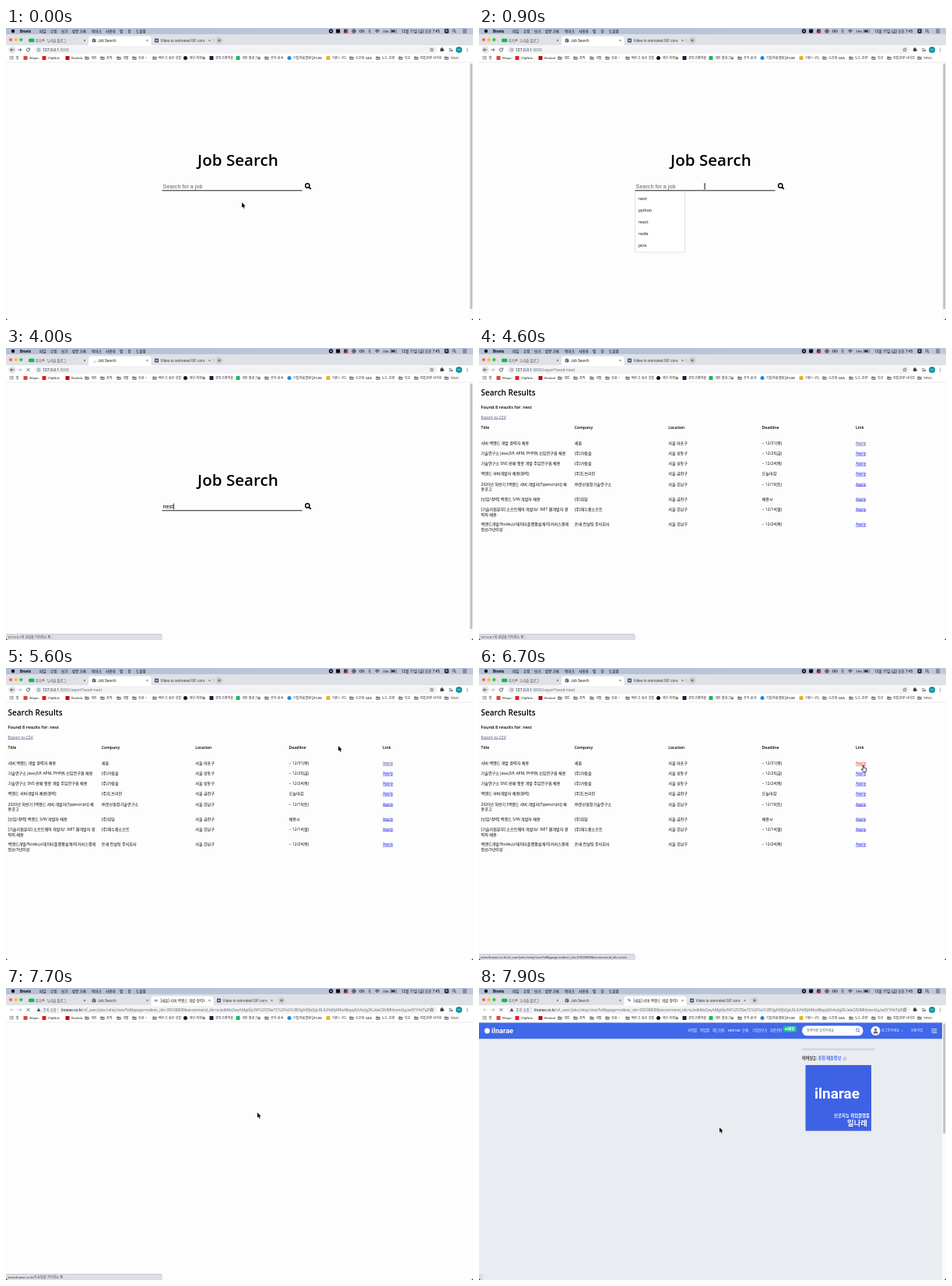
Write an HTML page with a canvas that moves like this. It is 600 px wide and 375 px high and loops after 8 s.

```html
<!DOCTYPE html>
<html lang="ko">
<head>
<meta charset="utf-8">
<title>Job Search</title>
<style>
html, body { margin: 0; width: 100%; height: 100%; overflow: hidden; background: #fdfdfd; }
canvas { display: block; width: 600px; height: 375px; }
</style>
</head>
<body>
<canvas id="stage" width="600" height="375"></canvas>
<script>
const canvas = document.getElementById('stage');
const c = canvas.getContext('2d');
const LOOP = 8000, STEP = 100;
const UI = 'Roboto, "Noto Sans CJK KR", "Noto Sans CJK", sans-serif';
const DOC = '"Open Sans", "Noto Sans CJK KR", "Noto Sans CJK", sans-serif';
const FORM = '"Liberation Sans", Arial, sans-serif';
const HOST = 'ilnarae.co.kr';
const QUERY = '/zf_user/jobs/relay/view?isMypage=no&rec_idx=39238828&recommend_ids=eJxd';
const WAITING = '의 응답을 기다리는 중...';

// --- drawing helpers; text is placed by its left edge and cap centre ---
// Laid out large and scaled down evenly, so tiny sizes keep true letter spacing.
const ZOOM = 10;
function text(s, x, y, size, color = '#222', weight = 400, family = UI) {
  c.save();
  c.translate(x, y + size * 0.36);
  c.scale(1 / ZOOM, 1 / ZOOM);
  c.font = `${weight} ${size * ZOOM}px ${family}`;
  c.fillStyle = color;
  c.fillText(s, 0, 0);
  const width = c.measureText(s).width / ZOOM;
  c.restore();
  return width;
}
function rect(x, y, w, h, color, r = 0) {
  c.fillStyle = color;
  c.beginPath();
  c.roundRect(x, y, w, h, r);
  c.fill();
}
function dot(x, y, r, color) {
  c.fillStyle = color;
  c.beginPath();
  c.arc(x, y, r, 0, 7);
  c.fill();
}
function arc(x, y, r, from, to, color, width) {
  c.strokeStyle = color;
  c.lineWidth = width;
  c.beginPath();
  c.arc(x, y, r, from, to);
  c.stroke();
}
function line(points, color, width) {
  c.strokeStyle = color;
  c.lineWidth = width;
  c.beginPath();
  points.forEach(([x, y], i) => i ? c.lineTo(x, y) : c.moveTo(x, y));
  c.stroke();
}
function cross(x, y, r, color, width) {
  line([[x - r, y - r], [x + r, y + r]], color, width);
  line([[x + r, y - r], [x - r, y + r]], color, width);
}
function clipped(x, y, w, h, draw) {
  c.save();
  c.beginPath();
  c.rect(x, y, w, h);
  c.clip();
  draw();
  c.restore();
}
function lens(x, y, r, color, width) {
  arc(x, y, r, 0, 7, color, width);
  line([[x + r * 0.75, y + r * 0.75], [x + r * 1.7, y + r * 1.7]], color, width * 1.2);
}

// --- desktop menu bar ---
function menuBar() {
  const sky = c.createLinearGradient(0, 0, 600, 0);
  sky.addColorStop(0, '#b3bfda');
  sky.addColorStop(1, '#c0c8dc');
  rect(0, 0, 600, 8, sky);
  dot(9, 4, 2.2, '#111');
  text('Brovix', 18, 4, 5, '#000', 700);
  [['파일', 43], ['수정', 57], ['보기', 71], ['방문 기록', 85], ['북마크', 110], ['사용자', 128],
   ['탭', 146], ['창', 156.5], ['도움말', 167]].forEach(([s, x]) => text(s, x, 4, 4.6, '#000', 500));
  dot(417.5, 4, 2.7, '#111');
  rect(416.6, 3.1, 1.8, 1.8, '#c0c8dc');
  rect(424, 1.5, 5.2, 5, '#111', 0.8);
  rect(434, 1.5, 5, 5, '#5b3034', 1);
  dot(438, 5, 1.5, '#e2382f');
  arc(447, 4, 2.2, 0, 7, '#222', 0.9);
  dot(447, 4, 0.9, '#222');
  arc(455.6, 4, 1.5, 0, 7, '#222', 0.7);
  arc(458.8, 4, 1.5, 0, 7, '#222', 0.7);
  line([[465.5, 2.6], [468.5, 5.4], [467, 6.8], [467, 1.2], [468.5, 2.6], [465.5, 5.4]], '#444', 0.5);
  [1.2, 2.6, 4].forEach(r => arc(477, 6.4, r, -2.35, -0.8, '#222', 0.8));
  text('78%', 484, 4, 4.4, '#111');
  c.strokeStyle = '#333';
  c.lineWidth = 0.5;
  c.strokeRect(494.5, 2.2, 7, 3.6);
  rect(495.3, 2.9, 4.4, 2.2, '#333');
  text('12월 11일 (금) 오후 7:45', 508, 4, 4.7, '#000');
  rect(563.5, 1.3, 5.2, 5.4, '#222', 1);
  text('A', 564.7, 4, 4, '#fff');
  lens(575.5, 3.5, 1.6, '#222', 0.7);
  [2, 4, 6].forEach(y => line([[587, y], [592, y]], '#222', 0.7));
}

// --- browser frame ---
function globe(x, y) {
  dot(x, y, 2.5, '#4d5156');
  line([[x - 1.8, y - 0.7], [x, y], [x - 0.5, y + 1.6]], '#e6e8eb', 0.8);
  line([[x + 0.3, y - 1.6], [x + 1.8, y - 0.5]], '#e6e8eb', 0.8);
}
function spinner(x, y, age, color, dir) {
  const head = -Math.PI / 2 + dir * age / 1000 * 5;
  const sweep = Math.min(1.6, 0.4 + age / 500);
  arc(x, y, 2.3, head - sweep / 2, head + sweep / 2, color, 0.8);
}
const icons = {
  blog: x => rect(x - 4, 13.6, 7.5, 4.6, '#19b85a', 1.6),
  globe: x => globe(x, 16),
  video: x => { rect(x - 2.5, 13.5, 5, 5, '#47566b', 0.6); rect(x - 1.5, 15.5, 3, 1.2, '#d7dce4'); }
};
function tab(x, w, icon, title, active) {
  if (active) rect(x, 10.5, w, 13, '#fff', [3, 3, 0, 0]);
  clipped(x, 10, w, 12, () => {
    icon(x + 7);
    clipped(x, 10, Math.max(0, w - 11), 12, () => {
      if (typeof title === 'string') text(title, x + 12, 16, 4.7, active ? '#222' : '#3c4043');
      else title(x + 12);
    });
    if (w > 40) cross(x + w - 5, 16, 1.2, '#444', 0.6);
  });
}
function pinnedTitle(x) {
  text('추가', x, 16, 4.3, '#3c4043');
  dot(x + 10, 15.5, 1.2, '#dd3b3b');
  line([[x + 9.6, 16], [x + 8.8, 18]], '#888', 0.5);
  text(': 누리솔 블로그', x + 12.2, 16, 4.3, '#3c4043');
}
function tabStrip(t) {
  rect(0, 8, 600, 15, '#dee1e6');
  ['#ff5f57', '#febc2e', '#28c840'].forEach((col, i) => dot(6 + i * 6.7, 15, 2.1, col));
  const opened = t >= 6900;
  const grow = opened ? Math.min(1, (t - 6800) / 300) : 0;
  const shift = 80 * (1 - (1 - grow) ** 2);
  const loading = t >= 2000 && t < 4600;
  tab(26, 80, icons.blog, pinnedTitle, false);
  tab(106, 80.5, loading ? x => spinner(x, 16, t - 2000, '#8b9097', -1) : icons.globe, 'Job Search', !opened);
  if (opened) {
    const named = t >= 7400;
    const icon = x => {
      if (named) dot(x, 16, 1.5, '#7aa4ee');
      spinner(x, 16, t - 6800, named ? '#2f6fe4' : '#8b9097', named ? 1 : -1);
    };
    tab(186.5, shift, icon, named ? '[새윰] 서버 백엔드 개발 경력자 채용' : '제목 없음', true);
  }
  tab(186.5 + shift, 80, icons.video, 'Video to animated GIF converter', false);
  if (!opened) line([[266.5, 13], [266.5, 19]], '#9a9ea5', 0.5);
  const plus = 274 + shift;
  dot(plus, 16, 4.6, '#cdd1d6');
  line([[plus - 2, 16], [plus + 2, 16]], '#444', 0.7);
  line([[plus, 14], [plus, 18]], '#444', 0.7);
}
function arrow(x, dir, color) {
  line([[x - 2.4 * dir, 28], [x + 2.4 * dir, 28]], color, 0.8);
  line([[x + 0.4 * dir, 26], [x + 2.4 * dir, 28], [x + 0.4 * dir, 30]], color, 0.8);
}
function toolbar(t) {
  rect(0, 22.2, 600, 22, '#fff');
  const opened = t >= 6900;
  if (!opened) dot(8, 28, 5, '#e6e8ea');
  arrow(8, -1, opened ? '#bbb' : '#333');
  arrow(17.5, 1, t < 2000 ? '#444' : '#aaa');
  if ((t >= 2000 && t < 4600) || opened) {
    cross(28.5, 28, 1.9, '#444', 0.8);
  } else {
    arc(28.5, 28, 2.1, 0.2, 5.4, '#444', 0.8);
    line([[30.8, 25.4], [30.8, 27.4], [28.8, 27.4]], '#444', 0.8);
  }
  rect(36, 23.3, 518, 9.6, '#f1f3f4', 4.8);
  if (opened && t >= 7200) {
    c.fillStyle = '#555';
    c.beginPath();
    c.moveTo(42, 25.6); c.lineTo(44.4, 30); c.lineTo(39.6, 30);
    c.fill();
    const warn = text('주의 요함', 47.5, 28, 4.4, '#5f6368');
    line([[49.5 + warn, 25.5], [49.5 + warn, 30.5]], '#aaa', 0.5);
    clipped(60, 23, 484, 10, () => {
      const host = text(HOST, 71, 28, 5, '#222');
      text(QUERY + 'kMsZwyAMg6fp3W%2FZSw7C%2FlvU%2BQghSfjbQpLRLIUHdSj44KuNbqojSA4cdg2KJaIeC0UMh6wmOgJw0YYAkTq2Lw',
        71 + host, 28, 5, '#70757a');
    });
  } else {
    arc(42, 28, 2, 0, 7, '#5f6368', 0.6);
    line([[42, 27.6], [42, 29.2]], '#5f6368', 0.6);
    if (opened) {
      text('about:blank', 47, 28, 5);
    } else {
      const host = text('127.0.0.1', 47, 28, 5.1);
      text(t < 4600 ? ':5000' : ':5000/report?word=nest', 47 + host, 28, 5.1, '#70757a');
    }
  }
  const star = Array.from({ length: 11 }, (_, i) => {
    const a = -Math.PI / 2 + i * Math.PI / 5, r = i % 2 ? 1.1 : 2.5;
    return [547 + r * Math.cos(a), 28 + r * Math.sin(a)];
  });
  line(star, '#444', 0.6);
  rect(558, 26.3, 3.8, 3.8, '#444', 0.5);
  dot(560, 26, 1, '#444');
  dot(562, 28.2, 1, '#444');
  [26.3, 28, 29.7].forEach(y => line([[569, y], [572.5, y]], '#444', 0.6));
  dot(573, 29, 0.9, '#444');
  dot(582, 28, 4.1, '#1295a5');
  line([[580, 28], [584, 28]], '#c8eef0', 0.7);
  [26, 28, 30].forEach(y => dot(592.5, y, 0.55, '#444'));
}

const square = col => x => rect(x - 2.5, 36, 5, 5, col, 0.5);
const disc = col => x => dot(x, 38.5, 2.5, col);
const folder = x => {
  rect(x - 2.6, 36.4, 2.6, 2, '#777', 0.4);
  rect(x - 2.6, 37, 5.2, 3.8, '#777', 0.5);
  rect(x - 1.9, 38.1, 3.8, 2, '#aaa');
};
const bookmarks = [
  [25, 'Wispo', square('#d9473b')], [49, 'ClipNub', square('#f01818')], [79, 'Reelorb', square('#b80b16')],
  [104, '개인', folder], [124, '조직', folder], [145, '개발', folder], [165, '유용', folder],
  [191, '배우고 싶은 것들', folder], [230.5, '개인 저장', disc('#111')], [264, '코딩고래마을', square('#172038')],
  [298, '개인 블로그', square('#19b85a')], [335, '공식 문서', folder], [364, '기업자료열람실PLIM', disc('#2688d8')],
  [414, '기반1 구드', square('#e7b52c')], [444, '스프링 Q&A', folder], [478, '노드 관련', folder],
  [507, '학교', folder], [527, '취업관련 사이트', folder], [566, 'TOVU', folder]
];
function bookmarkBar() {
  for (let i = 0; i < 9; i++) {
    rect(4.6 + i % 3 * 1.8, 36 + Math.floor(i / 3) * 1.8, 1.2, 1.2, ['#e04a3f', '#2f9e58', '#3d7be0', '#e9b224'][i % 4]);
  }
  text('앱', 12.5, 38.5, 4.1);
  bookmarks.forEach(([x, name, icon]) => { icon(x); text(name, x + 5, 38.5, 4.2, '#222'); });
  dot(180, 38, 1, '#f3c84a');
  [254, 325].forEach(x => { rect(x - 1.3, 38, 3, 2.2, '#7b7d64'); line([[x - 2, 38.3], [x, 36.6], [x + 2, 38.3]], '#a0522d', 0.7); });
  line([[0, 44], [600, 44]], '#dcdee1', 0.6);
}
function scrollThumb(bottom) {
  rect(595, 44.3, 5, 331, '#fafafa');
  rect(596.3, 45.5, 3, bottom - 45.5, '#c1c1c1', 1.5);
}
function status(s) {
  rect(-1, 367, 201.5, 9, '#b9bec5', [0, 2, 0, 0]);
  rect(-1, 367.5, 201, 9, '#dbdfe4', [0, 2, 0, 0]);
  clipped(0, 366, 198, 9, () => text(s, 2, 371.3, 4.2, '#333'));
}

// --- search page ---
function suggestions(words) {
  const h = words.length * 15 + 3;
  rect(200, 209.6, 65, h + 0.6, '#c4c4c4', 1.5);
  rect(200.5, 210, 64, h - 0.3, '#fff', 1.2);
  words.forEach((w, i) => text(w, 205, 219 + i * 15, 5.6, '#222'));
}
function searchPage(t) {
  text('Job Search', 246, 169.5, 20.6, '#000', 600, DOC);
  const word = 'nest'.slice(0, [1100, 1200, 1500, 1700].filter(at => t >= at).length);
  const width = text(word, 201.6, 203.7, 7.2, '#000', 400, FORM);
  if (!word) text('Search for a job', 201.6, 203.7, 7.2, '#5c5c5c', 400, FORM);
  rect(200.5, 208.2, 180, 1, '#222');
  lens(387.3, 202.4, 2.65, '#000', 1.4);
  const typedAt = [400, 1100, 1200, 1500, 1700].filter(at => t >= at).pop();
  if (typedAt !== undefined && Math.floor((t - typedAt) / 500) % 2 === 0) {
    rect(201.8 + width, 199.5, 0.7, 8, '#000');
  }
  if (t >= 500 && t < 1100) suggestions(['nest', 'python', 'react', 'node', 'java']);
  else if (t >= 1100 && t < 1200) suggestions(['nest', 'node']);
  else if (t >= 1200 && t < 1700) suggestions(['nest']);
  scrollThumb(361);
}

// --- results page ---
const columns = [2.5, 122.8, 243.2, 363.6, 484];
const rows = [
  [122.5, ['서버 백엔드 개발 경력자 채용'], '새윰', '마포구', '~ 12/31(목)'],
  [135.5, ['기술연구소 Java·JSP, APM, PHP外 신입연구원 채용'], '(주)가람솔', '성동구', '~ 12/25(금)'],
  [148.5, ['기술연구소 SNS 판매 챗봇 개발 주임연구원 채용'], '(주)가람솔', '성동구', '~ 12/24(목)'],
  [161.5, ['백엔드 서버개발자 채용(경력)'], '(주)도브리안', '금천구', '오늘마감'],
  [174.7, ['2020년 하반기 [백엔드 서버 개발자(Typescript)] 채', '용공고'], '㈜분산원장기술연구소', '강남구', '~ 12/19(토)'],
  [194.2, ['[신입/경력] 백엔드 S/W 개발자 채용'], '(주)휘담', '금천구', '채용시'],
  [207.2, ['[기술지원본부] 소프트웨어 개발자/ .NET 웹개발자 경', '력직 채용'], '(주)해누름소프트', '강남구', '~ 12/14(월)'],
  [226.5, ['백엔드개발/Node.js/데이터플랫폼설계/이커머스결제', '정산/3년이상'], '온새 컨설팅 주식회사', '강남구', '~ 12/24(목)']
];
function link(s, x, y, color) {
  const w = text(s, x, y, 5.1, color, 400, DOC);
  rect(x, y + 2.4, w, 0.5, color);
}
function resultsPage(t) {
  const cell = (s, i, y) => text(s, columns[i], y, 5.1, '#000', 400, DOC);
  text('Search Results', 2.5, 57.7, 10, '#000', 600, DOC);
  text('Found 8 results for: nest', 2.5, 75.7, 5.6, '#000', 600, DOC);
  link('Export to CSV', 2.5, 89.2, '#554c77');
  ['Title', 'Company', 'Location', 'Deadline', 'Link'].forEach((s, i) =>
    text(s, columns[i], 102.4, 5.1, '#000', 600, DOC));
  rows.forEach(([y, title, company, area, due], n) => {
    title.forEach((s, i) => cell(s, 0, y + i * 6.6));
    cell(company, 1, y);
    cell('서울 ' + area, 2, y);
    cell(due, 3, y);
    link('Apply', columns[4], y, n ? '#0000ee' : t >= 6600 ? '#ee2200' : '#4b3199');
  });
}

// --- job site ---
function jobSite(full) {
  rect(0, 44.3, 600, 331, '#e9ecf1');
  rect(0, 44.3, 595, 21, '#3f68ea');
  dot(10.5, 55, 3.4, '#fff');
  text('ilnarae', 16, 54.5, 9.2, '#fff', 700);
  [['지역별', 268], ['직업별', 284], ['헤드헌팅', 300], ['HOT100', 320], ['공채', 338], ['기업연구소', 351],
   ['취준진단', 374]].forEach(([s, x]) => text(s, x, 54.3, 4.3, '#fff', 500));
  rect(391, 49, 17, 7.5, '#24c39a', 2);
  text('AI매칭', 393, 52.8, 4.4, '#fff', 700);
  rect(415, 48.5, 78.5, 12.8, '#fff', 6.4);
  text('검색어를 입력하세요', 421, 54.7, 4.1, '#555');
  lens(486.5, 54, 1.9, '#3f68ea', 0.8);
  dot(509.5, 55, 6, '#fff');
  dot(509.5, 53.4, 1.6, '#667');
  rect(506.8, 55.6, 5.4, 2.8, '#667', [2, 2, 0, 0]);
  text('로그인하세요', 517, 54.7, 4.2, '#fff');
  line([[542.4, 54.2], [543.8, 55.6], [545.2, 54.2]], '#cfdaff', 0.6);
  text('회원가입', 555, 54.7, 4.2, '#fff');
  for (let i = 0; i < 9; i++) rect(581.8 + i % 3 * 2.3, 52 + Math.floor(i / 3) * 2.3, 1.3, 1.3, '#fff');
  scrollThumb(187);
  if (!full) return;
  rect(415, 77.5, 94, 2.6, '#d2d5da');
  const w = text('이어보는 ', 415, 90, 5.2, '#222', 700);
  text('추천 채용정보', 415 + w, 90, 5.2, '#3f68ea', 700);
  arc(470, 90.8, 2, 0, 7, '#888', 0.5);
  line([[470, 90], [470, 92]], '#777', 0.5);
  rect(419.5, 99, 84.5, 84.5, '#3d62e4');
  text('ilnarae', 431, 135.5, 19, '#fff', 700);
  text('인공지능 취업플랫폼', 456, 164, 5.4, '#fff', 600);
  text('일나래', 473, 173.5, 9.4, '#fff', 700);
}

// --- pointer ---
// Each stop is [time, x, y]; movement eases between neighbours.
const stops = [
  [100, 303, 224], [400, 290, 203], [4700, 290, 203], [5400, 420, 106], [5500, 420, 106], [5600, 427, 100],
  [6000, 528, 117], [6400, 494, 126], [6500, 493, 125], [6900, 493, 125], [7700, 323, 160], [7900, 309, 179]
];
function pointerAt(t) {
  if (t <= stops[0][0]) return stops[0].slice(1);
  const i = stops.findIndex(s => t <= s[0]);
  const [t0, x0, y0] = stops[i - 1], [t1, x1, y1] = stops[i];
  const k = (t - t0) / (t1 - t0), e = k * k * (3 - 2 * k);
  return [x0 + (x1 - x0) * e, y0 + (y1 - y0) * e];
}
function shape(x, y, points) {
  c.beginPath();
  points.forEach(([dx, dy]) => c.lineTo(x + dx, y + dy));
  c.closePath();
}
function pointer(t) {
  if (t >= 1100 && t < 4800) return;
  const [x, y] = pointerAt(t);
  if (t >= 300 && t < 1100) {
    line([[x - 1.2, y - 3.5], [x, y - 3], [x, y + 3.5], [x - 1.2, y + 4]], '#111', 0.6);
    line([[x + 1.2, y - 3.5], [x, y - 3], [x, y + 3.5], [x + 1.2, y + 4]], '#111', 0.6);
  } else if (t >= 6400 && t < 6900) {
    shape(x, y, [[0, 0], [1.2, 0], [1.6, 3], [4.6, 3.8], [4.8, 6], [3.9, 8.4], [0.6, 8.4], [-1.8, 5.2], [-1, 4.5], [0.3, 5.4]]);
    c.fillStyle = '#fff';
    c.fill();
    c.strokeStyle = '#111';
    c.lineWidth = 0.8;
    c.stroke();
  } else {
    shape(x, y, [[0, 0], [0, 6.6], [1.5, 5.2], [2.6, 7.8], [3.7, 7.3], [2.6, 4.9], [4.6, 4.8]]);
    c.strokeStyle = '#fff';
    c.lineWidth = 1.1;
    c.stroke();
    c.fillStyle = '#000';
    c.fill();
  }
}

function corners() {
  c.fillStyle = '#333';
  [[0, 1], [600, -1]].forEach(([x, d]) => {
    c.beginPath();
    c.moveTo(x, 373); c.lineTo(x, 375); c.lineTo(x + 2 * d, 375);
    c.fill();
  });
}

function draw(t) {
  rect(0, 0, 600, 375, '#fdfdfd');
  if (t < 4600) searchPage(t);
  else if (t < 6900) resultsPage(t);
  else if (t >= 7800) jobSite(t >= 7900);
  tabStrip(t);
  toolbar(t);
  bookmarkBar();
  menuBar();
  if (t >= 2200 && t < 4800) status('127.0.0.1' + WAITING);
  else if (t >= 6400 && t < 6900) status('www.' + HOST + QUERY + '...');
  else if (t >= 7200 && t < 7900) status('www.' + HOST + WAITING);
  else if (t >= 7900) rect(-1, 367.5, 6.5, 8, '#d9dde3', [0, 2, 0, 0]);
  corners();
  pointer(t);
}

const start = performance.now();
function frame() {
  const elapsed = (performance.now() - start) % LOOP;
  draw(Math.floor(elapsed / STEP) * STEP);
  requestAnimationFrame(frame);
}
frame();
</script>
</body>
</html>
```
